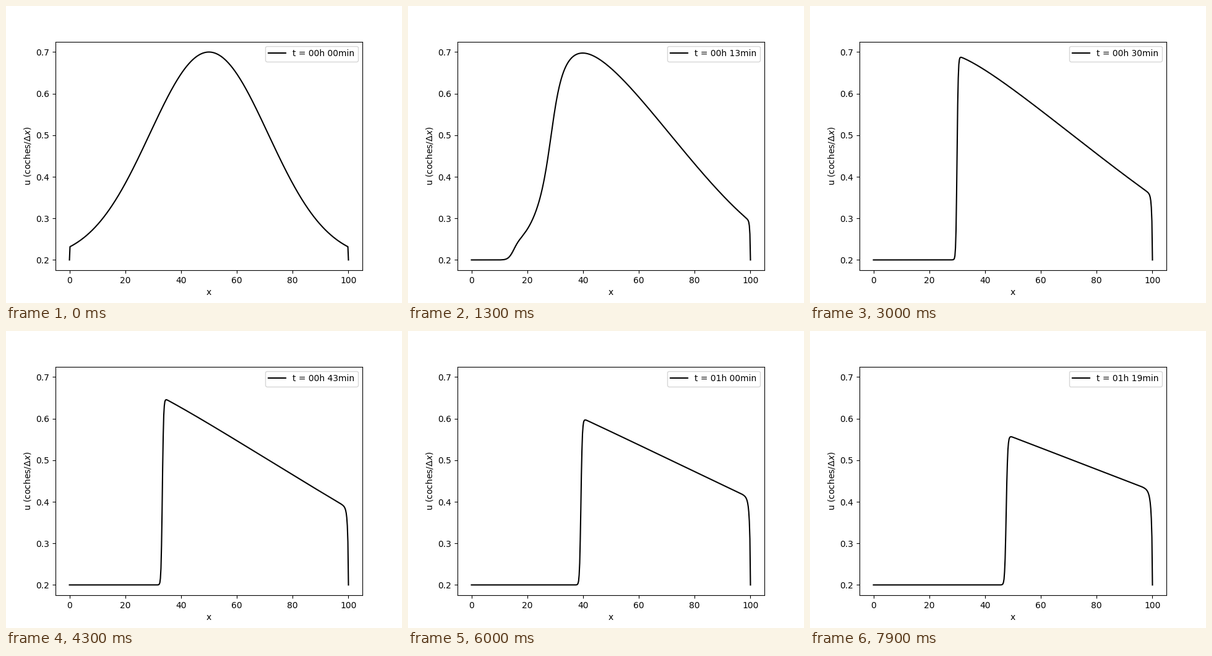
These frames come from a looping animation (640 by 480 pixels, 8 s). A matplotlib script:

```python
import matplotlib.pyplot as plt
import numpy as np
from matplotlib.animation import FuncAnimation

# Traffic density on a road: u_t + (V u (1 - u))_x = 0, Lax-Friedrichs scheme
V = 2.0            # free speed per minute
DX, DT = 0.2, 0.1
STEPS = 10         # time steps per minute
MINUTES = 80
U_EDGE = 0.2

x = np.linspace(0, 100, round(100 / DX) + 1)


def flux(u):
    return V * u * (1 - u)


def advance(u):
    f = flux(u)
    new = u.copy()
    new[1:-1] = (u[:-2] + u[2:]) / 2 - DT / (2 * DX) * (f[2:] - f[:-2])
    return new


def solve():
    u = U_EDGE + 0.5 * np.exp(-((x - 50) / 30) ** 2)
    u[0] = u[-1] = U_EDGE
    profiles = [u]
    for _ in range(MINUTES - 1):
        for _ in range(STEPS):
            u = advance(u)
        profiles.append(u)
    return profiles


def label(minute):
    return f"t = {minute // 60:02d}h {minute % 60:02d}min"


profiles = solve()

fig, ax = plt.subplots(figsize=(6.4, 4.8), dpi=100)
line, = ax.plot(x, profiles[0], color="black", lw=1.5, label=label(0))
ax.set_xlim(-5, 105)
ax.set_ylim(0.175, 0.725)
ax.set_xlabel("x")
ax.set_ylabel(r"u (coches/$\Delta x$)")
text = ax.legend(loc="upper right").get_texts()[0]


def update(minute):
    line.set_ydata(profiles[minute])
    text.set_text(label(minute))
    return line, text


anim = FuncAnimation(fig, update, frames=MINUTES, interval=100,
                     repeat=True, repeat_delay=0, blit=False)

plt.show()
```
